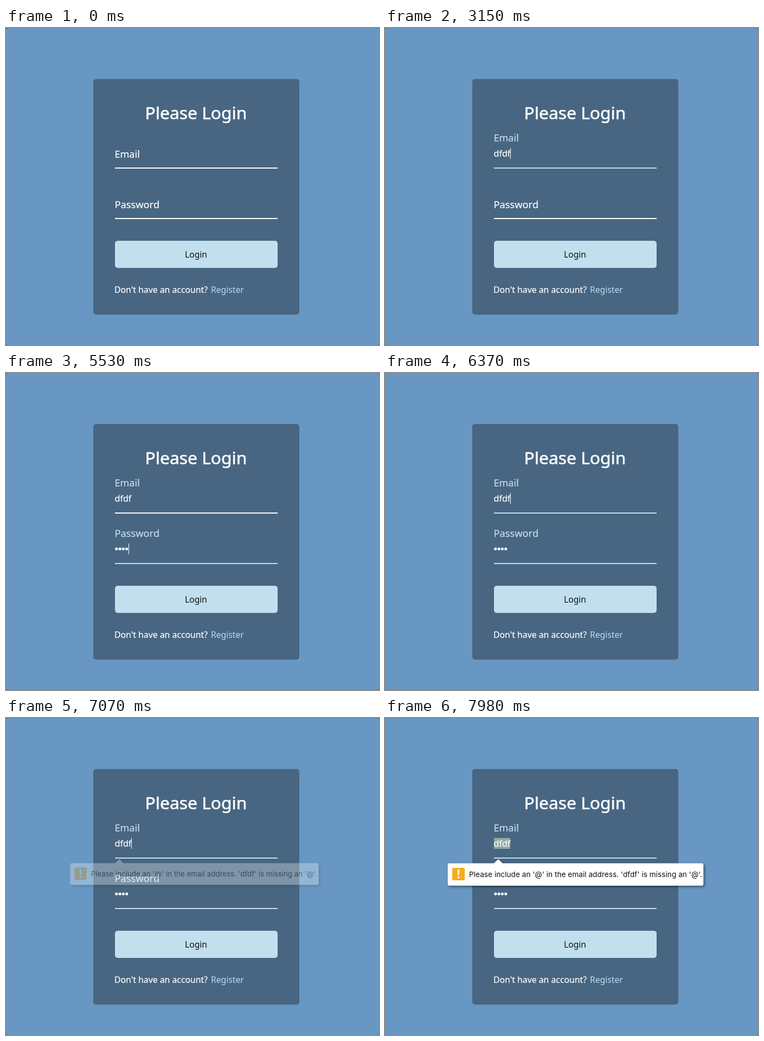
An HTML page that plays this animation: 688 px wide and 584 px high, repeating every 8000 ms.

```html
<!DOCTYPE html>
<html lang="en">
<head>
<meta charset="utf-8">
<title>Login form</title>
<style>
  html, body { margin: 0; height: 100%; overflow: hidden; background: #47698a; }
  svg { display: block; font-family: "Noto Sans", "Open Sans", sans-serif; }
  text { fill: #fff; white-space: pre; }
  .form text { stroke: currentColor; stroke-width: .2px; color: #fff; }
  #tip text { font-family: Inter, Roboto, sans-serif; }
</style>
</head>
<body>
<svg width="688" height="584" viewBox="0 0 688 584">
  <rect width="688" height="584" rx="4" fill="#6797c2"/>
  <rect x="161" y="94" width="380" height="434" rx="5" fill="#486682"/>
  <g class="form">
    <text x="350.5" y="168" font-size="31.8" text-anchor="middle" style="stroke-width:.6px">Please Login</text>
    <text id="emailLabel" font-size="18"></text>
    <text id="passLabel" font-size="18.2"></text>
    <rect id="selection" x="201" y="221" width="30" height="20" fill="#8caba0"/>
    <text id="email" x="200.5" y="237" font-size="16.1"></text>
    <g id="dots" fill="#fff"></g>
    <rect id="caret" width="1" height="20" fill="#fff"/>
    <rect id="emailLine" x="201" y="257" width="300" height="2"/>
    <rect id="passLine" x="201" y="350" width="300" height="2"/>
    <rect x="201" y="392" width="300" height="50" rx="5" fill="#c1dfed"/>
    <text x="350.5" y="423" font-size="15.6" text-anchor="middle" style="fill:#101418;stroke:none">Login</text>
    <text x="200" y="488" font-size="15.8">Don't have an account?</text>
    <text x="378" y="488" font-size="15.7" style="fill:#b9dbf5;stroke:none">Register</text>
  </g>
  <g id="tip">
    <path d="M118 267.5H201L209 260L217 267.5H584.5a3 3 0 0 1 3 3V306a3 3 0 0 1-3 3H118.500a3 3 0 0 1-3-3V270.500a3 3 0 0 1 3-3Z"
      fill="#fff" stroke="#0003" stroke-width=".6" style="filter:drop-shadow(2px 2px 2px #0007)"/>
    <rect x="124" y="276" width="23" height="23" rx="2" fill="#faab1c"/>
    <path d="M133.600 279.500h3.800l-.6 10h-2.600z" fill="#fff"/>
    <circle cx="135.500" cy="293.500" r="1.900" fill="#fff"/>
    <text x="155" y="293" font-size="13.7" style="fill:#111">Please include an '@' in the email address. 'dfdf' is missing an '@'.</text>
  </g>
</svg>
<script>
const LOOP = 8000;
const EMAIL_FOCUS = 1260, PASS_FOCUS = 3200, SUBMIT = 5810, SELECT = 7700;
const emailKeys = [2310, 2450, 2660, 2870];
const passKeys = [3920, 4060, 4200, 4340];
const WHITE = [255, 255, 255], BLUE = [193, 223, 240];

const $ = id => document.getElementById(id);
const set = (el, attrs) => { for (const k in attrs) el.setAttribute(k, attrs[k]); };
const clamp = x => Math.min(1, Math.max(0, x));
const mix = p => `rgb(${WHITE.map((w, i) => w + (BLUE[i] - w) * clamp(p))})`;
const typed = (keys, t) => keys.filter(k => t >= k).length;

function add(parent, tag, attrs, text = "") {
  const el = document.createElementNS("http://www.w3.org/2000/svg", tag);
  set(el, attrs);
  el.textContent = text;
  parent.append(el);
  return el;
}

// cubic-bezier(.68, -.55, .265, 1.55)
function bounce(x) {
  if (x <= 0 || x >= 1) return clamp(x);
  const curve = (a, b, s) => 3 * a * s * (1 - s) ** 2 + 3 * b * s * s * (1 - s) + s ** 3;
  let lo = 0, hi = 1;
  for (let i = 0; i < 24; i++) {
    const mid = (lo + hi) / 2;
    if (curve(.68, .265, mid) < x) lo = mid; else hi = mid;
  }
  return curve(-.55, 1.55, lo);
}

const letters = (id, word) => [...word].map((c, i) => add($(id), "tspan", i ? {} : { x: 200.5 }, c));
const emailLetters = letters("emailLabel", "Email");
const passLetters = letters("passLabel", "Password");
const dots = passKeys.map((_, i) => add($("dots"), "circle", { cx: 203.8 + 6.3 * i, cy: 324, r: 2.6 }));

function wave(spans, y, t) {
  spans.forEach((span, i) => {
    const p = bounce((t - i * 50) / 300);
    const color = mix(p);
    set(span, { y: y - 30 * p, style: `fill:${color};stroke:${color}` });
  });
}

function drawCaret(t, inEmail, chars, inPass, count) {
  const start = inEmail ? EMAIL_FOCUS : PASS_FOCUS;
  const keys = inEmail ? emailKeys : passKeys;
  const last = Math.max(start, ...keys.filter(k => t >= k));
  const lit = t >= SUBMIT ? t < SELECT : (t - last) % 1000 < 500;
  const x = inEmail ? [201, 210, 215.500, 225, 231][chars] : 201 + Math.round(6.3 * count);
  set($("caret"), { x, y: inEmail ? 221 : 314, opacity: +(lit && (inEmail || inPass)) });
}

function draw(t) {
  const inPass = t >= PASS_FOCUS && t < SUBMIT;
  const inEmail = t >= EMAIL_FOCUS && !inPass;
  const chars = typed(emailKeys, t), count = typed(passKeys, t);

  wave(emailLetters, 239, t - EMAIL_FOCUS);
  wave(passLetters, 332, t - PASS_FOCUS);
  $("email").textContent = "dfdf".slice(0, chars);
  dots.forEach((dot, i) => set(dot, { opacity: +(i < count) }));
  set($("emailLine"), { fill: mix(+inEmail) });
  set($("passLine"), { fill: mix(+(t >= PASS_FOCUS)) });
  set($("selection"), { opacity: +(t >= SELECT) });
  drawCaret(t, inEmail, chars, inPass, count);

  const p = clamp((t - 6400) / 1550) ** 1.45;
  const scale = .96 + .04 * p;
  set($("tip"), { opacity: p, transform: `translate(209 260) scale(${scale}) translate(-209 -260)` });
}

function frame(now) {
  draw(now % LOOP);
  requestAnimationFrame(frame);
}
draw(0);
requestAnimationFrame(frame);
</script>
</body>
</html>
```
